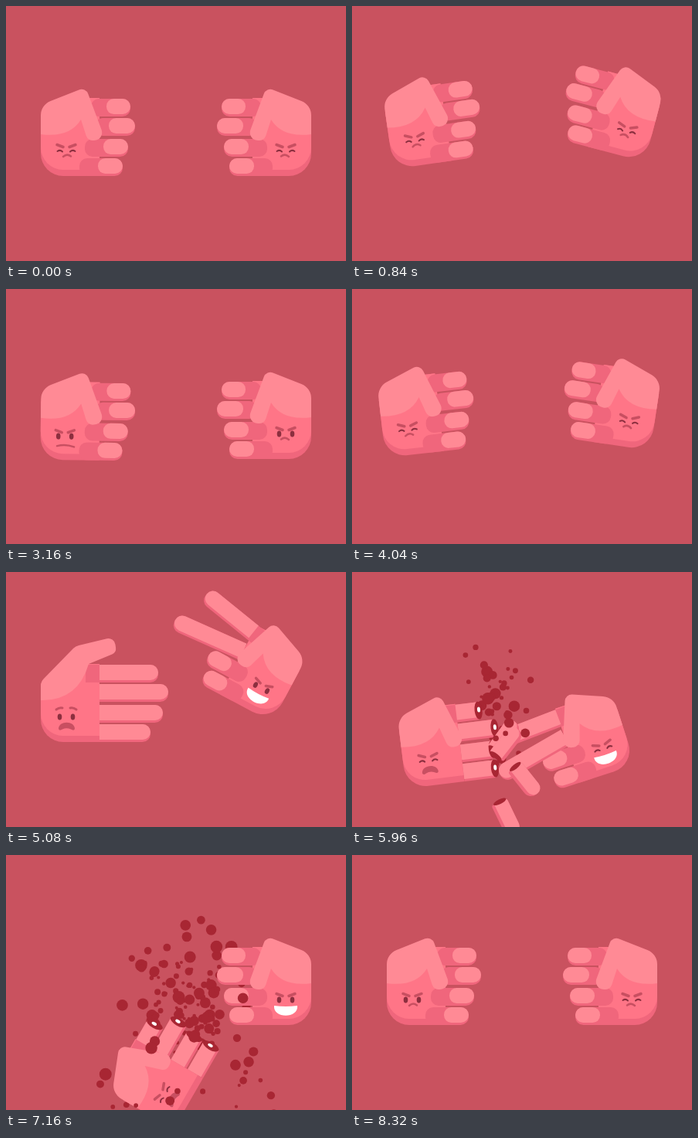
Recreate the animation shown at these times as an HTML page with a canvas. Size 440 px wide and 330 px high, loop 8360 ms.

```html
<!DOCTYPE html>
<html lang="en">
<head>
<meta charset="utf-8">
<title>Rock, paper, scissors</title>
<style>
html, body { margin: 0; width: 100%; height: 100%; overflow: hidden; background: #c9525f; }
canvas { display: block; width: 440px; height: 330px; }
</style>
</head>
<body>
<canvas id="stage" width="440" height="330"></canvas>
<script>
const ctx = document.getElementById('stage').getContext('2d');
const LOOP = 8360, CUT = 5680, REGROW = 7500;
const C = {
  bg: '#c9525f', light: '#ff8a95', mid: '#ff7587', dark: '#f0667c',
  brow: '#c84f61', eye: '#8c2f3f', blood: '#a82633', white: '#fff'
};

const mix = (a, b, k) => a + (b - a) * k;
const ease = k => (1 - Math.cos(Math.PI * k)) / 2;

// Keys are [time, ...values]; every span eases in and out.
function track(keys, t) {
  if (t <= keys[0][0]) return keys[0].slice(1);
  for (let i = 1; i < keys.length; i++) {
    const a = keys[i - 1], b = keys[i];
    if (t < b[0]) {
      const k = ease((t - a[0]) / (b[0] - a[0]));
      return a.slice(1).map((v, j) => mix(v, b[j + 1], k));
    }
  }
  return keys[keys.length - 1].slice(1);
}

const REST = [0, 0, 0], DOWN = [0, 34, 15], UP = [0, -31, -15];

function pumps(lag, settle) {
  const keys = [[0, ...REST], [lag, ...REST]];
  for (let i = 0; i < 3; i++) {
    keys.push([300 + 820 * i + lag, ...DOWN]);
    keys.push([i < 2 ? 710 + 820 * i + lag : settle, ...UP]);
  }
  return keys.concat([
    [settle + 310, ...REST], [3120 + lag, ...REST],
    [3420 + lag, ...DOWN], [3830 + lag, ...UP]
  ]);
}

// Both hands share one left-hand space; the right one is mirrored.
const leftMove = pumps(0, 2330).concat([
  [4080, -9, -6, -6], [4260, 3, 14, 4], [4540, ...REST], [5300, ...REST],
  [5640, 18, 57, -7], [5960, 18, 54, -7], [6200, 2, 42, -18],
  [6480, 30, 52, -30], [7160, 96, 115, -60], [REGROW - 1, 110, 270, -75],
  [REGROW, 0, 230, 20], [7900, 0, -36, -12], [8330, ...REST]
]);
const rightMove = pumps(110, 2400).concat([
  [4200, 0, 8, 5], [4520, 18, -50, -31], [4800, 18, -45, -28],
  [5340, 18, -45, -28], [5640, 50, 42, 19], [5960, 43, 49, 18],
  [6300, 6, -20, -12], [6560, ...REST], [6760, 0, -25, -10], [7020, ...REST]
]);
const paperOpen = [[4040, 0], [4240, 1], [5640, 1], [5860, 0]];
const scissorsOpen = [[4180, 0], [4440, 1], [6020, 1], [6300, 0]];
const scissorsTilt = [
  [4180, 0, 0], [4440, -11, 4], [5400, -11, 4], [5520, -18, 10],
  [5660, 3, 12], [6020, 3, 12], [6300, 0, 0]
];

const TOP = [120, 145, 172, 197];
const FIST_TIP = [161, 167, 158, 151];
const PAPER_TIP = [197, 210, 203, 187];
const SCISSORS_TIP = [199, 218, 158, 151];
const STUMP = [150, 168, 162, 162];
const FIST_PAD = [130, 133, 126, 119];
const FIST_BASE = [110, 115, 102, 95];

function box(x, y, w, h, r, color) {
  ctx.fillStyle = color;
  ctx.beginPath();
  ctx.roundRect(x, y, w, h, r);
  ctx.fill();
}
function oval(x, y, rx, ry, color) {
  ctx.fillStyle = color;
  ctx.beginPath();
  ctx.ellipse(x, y, rx, ry, 0, 0, 7);
  ctx.fill();
}
function stroke(color, width, x1, y1, cx, cy, x2, y2) {
  ctx.strokeStyle = color;
  ctx.lineWidth = width;
  ctx.lineCap = 'round';
  ctx.beginPath();
  ctx.moveTo(x1, y1);
  ctx.quadraticCurveTo(cx, cy, x2, y2);
  ctx.stroke();
}

function drawPalm() {
  const shape = (bottom, color) => {
    ctx.fillStyle = color;
    ctx.beginPath();
    ctx.moveTo(45, 145);
    ctx.lineTo(100, 119);
    ctx.lineTo(121, 119);
    ctx.lineTo(121, bottom);
    ctx.arcTo(45, bottom, 45, 150, 29);
    ctx.closePath();
    ctx.fill();
  };
  shape(220, C.dark);
  shape(212, C.mid);
}

function drawFinger(i, tip, open, tilt, cut) {
  const y = TOP[i], pad = mix(FIST_PAD[i], 121, open);
  const base = mix(FIST_BASE[i], i ? 121 : 103, open);
  const end = cut ? 0 : 10.5;
  ctx.save();
  ctx.translate(110, y + 10);
  ctx.rotate(tilt * Math.PI / 180);
  ctx.translate(-110, -y - 10);
  box(base, y, tip - base, 23, [10 * (1 - open), end, end, 10 * (1 - open)], C.dark);
  const back = 10 * (1 - open);
  box(pad, y, tip - pad, 20, [back, end, end, back], C.light);
  if (cut) {
    oval(tip, y + 11, 5, 11.5, C.blood);
    oval(tip + .5, y + 10, 2, 3.5, C.white);
  }
  ctx.restore();
}

function drawThumb(open) {
  const p = (x, y, u, v) => [mix(x, u, open), mix(y, v, open)];
  const corners = [
    [p(45, 128, 45, 142), mix(20, 13, open)],
    [p(103, 105, 90, 96), mix(9, 15, open)],
    [p(128, 172, 140, 84), mix(10, 9, open)],
    [p(106, 175, 143, 104), mix(9, 8, open)],
    [p(97, 147, 107, 119), 2]
  ];
  const notch = corners[4][0], bend = p(82, 171, 93, 167);
  ctx.fillStyle = C.light;
  ctx.beginPath();
  ctx.moveTo(45, 166);
  for (let i = 0; i < 4; i++) {
    ctx.arcTo(...corners[i][0], ...corners[i + 1][0], corners[i][1]);
  }
  ctx.lineTo(...notch);
  ctx.quadraticCurveTo(...bend, 45, 166);
  ctx.fill();
}

function drawFace(mood) {
  const squint = ['squint', 'cry', 'laugh'].includes(mood);
  const low = mood === 'stern' ? 2 : 0;
  const dx = mood === 'stern' ? -1.5 : 0;
  ctx.save();
  ctx.translate(78 + dx, 187 + low);
  for (const s of [-1, 1]) {
    if (mood === 'sad') stroke(C.brow, 3, s * 5, -11, s * 9, -12, s * 13, -9);
    else stroke(C.brow, 3.5, s * 4, -4.5, s * 8, -6, s * 12, -7.5);
    if (squint) stroke(C.eye, 2, s * 5, 1.5, s * 8, -1.5, s * 11.5, 1);
    else oval(s * 8.5, .5, 2.8, 4, C.eye);
  }
  if (mood === 'grin' || mood === 'laugh') {
    ctx.fillStyle = C.white;
    ctx.beginPath();
    ctx.moveTo(-15, 8);
    ctx.quadraticCurveTo(0, 10, 15, 8);
    ctx.bezierCurveTo(17, 25, -17, 25, -15, 8);
    ctx.fill();
  } else if (mood === 'sad' || mood === 'cry') {
    ctx.fillStyle = C.brow;
    ctx.beginPath();
    ctx.moveTo(-10, 16);
    ctx.bezierCurveTo(-10, 5, 11, 5, 11, 16);
    ctx.quadraticCurveTo(10, 19, 6, 16.5);
    ctx.quadraticCurveTo(0, 14, -5, 16.5);
    ctx.quadraticCurveTo(-9, 19, -10, 16);
    ctx.fill();
  } else if (mood === 'stern') {
    stroke(C.brow, 2.5, -10, 13, 1, 10, 12, 14);
  } else {
    stroke(C.brow, 2.5, -4, 8, 1, 3.5, 6, 7.5);
  }
  ctx.restore();
}

function drawHand(hand) {
  const [x, y, angle] = hand.move;
  ctx.save();
  if (hand.mirror) {
    ctx.translate(440, 0);
    ctx.scale(-1, 1);
  }
  ctx.translate(100 + x, 164 + y);
  ctx.rotate(angle * Math.PI / 180);
  ctx.translate(-100, -164);
  drawPalm();
  for (let i = 3; i >= 0; i--) {
    drawFinger(i, hand.tips[i], hand.open[i], hand.tilt[i], hand.cut);
  }
  drawThumb(hand.thumb);
  drawFace(hand.mood);
  ctx.restore();
}

function moodAt(list, t) {
  return list.filter(m => t >= m[0]).pop()[1];
}
const leftMoods = [[0, 'squint'], [2680, 'stern'], [3260, 'squint'], [4240, 'stern'],
  [4640, 'sad'], [CUT, 'cry'], [REGROW, 'open']];
const rightMoods = [[0, 'squint'], [2760, 'open'], [3360, 'squint'], [4400, 'grin'],
  [5600, 'laugh'], [6600, 'grin'], [7700, 'open'], [8260, 'squint']];

function seeded(seed) {
  return () => (seed = seed * 16807 % 2147483647) / 2147483647;
}
function stumpPoint(i, t) {
  const [x, y, angle] = track(leftMove, t), a = angle * Math.PI / 180;
  const u = STUMP[i] - 100, v = TOP[i] + 11 - 164;
  return [100 + x + u * Math.cos(a) - v * Math.sin(a),
          164 + y + u * Math.sin(a) + v * Math.cos(a)];
}
const rand = seeded(4217);
const drops = Array.from({ length: 290 }, (_, i) => {
  const birth = CUT + i / 290 * 1490;
  const [x, y] = stumpPoint(i % 4, birth);
  return {
    birth, x, y, front: i % 5 === 0,
    vx: -70 + 310 * rand(), vy: -240 - 420 * rand(), r: 2 + 6 * rand() ** 1.6
  };
});
function drawDrops(t, front) {
  for (const d of drops) {
    const s = (t - d.birth) / 1000;
    if (d.front !== front || s < 0) continue;
    const y = d.y + d.vy * s + 950 * s * s;
    if (y < 340) oval(d.x + d.vx * s, y, d.r, d.r, C.blood);
  }
}

// Severed fingertips tumble off the stage: x, y, angle, vx, vy, spin.
const pieces = [
  [172, 196, -.1, 90, -30, -3], [190, 224, .1, 35, -100, -3.6],
  [190, 250, 0, 125, -20, 3.2], [184, 270, 0, 60, 80, 4]
];
function drawPieces(t) {
  const s = (t - CUT) / 1000;
  if (s < 0 || s > 1) return;
  for (const [x, y, a, vx, vy, spin] of pieces) {
    ctx.save();
    ctx.translate(x + vx * s, y + vy * s + 260 * s * s + 700 * s ** 4);
    ctx.rotate(a + spin * s);
    box(-22, -10, 45, 22, [3, 11, 11, 3], C.dark);
    box(-22, -10, 45, 18, [3, 10, 10, 3], C.light);
    oval(-22, 0, 3, 9, C.blood);
    ctx.restore();
  }
}

function draw(t) {
  ctx.fillStyle = C.bg;
  ctx.fillRect(0, 0, 440, 330);
  const cut = t >= CUT && t < REGROW;
  const [paper] = track(paperOpen, t), [snip] = track(scissorsOpen, t);
  const [tilt1, tilt2] = track(scissorsTilt, t);
  drawDrops(t, false);
  drawHand({
    move: track(leftMove, t), cut, thumb: paper,
    tips: FIST_TIP.map((v, i) => cut ? STUMP[i] : mix(v, PAPER_TIP[i], paper)),
    open: Array(4).fill(cut ? 1 : paper), tilt: [0, 0, 0, 0],
    mood: moodAt(leftMoods, t)
  });
  drawHand({
    move: track(rightMove, t), mirror: true, thumb: 0,
    tips: FIST_TIP.map((v, i) => mix(v, SCISSORS_TIP[i], snip)),
    open: [snip, snip, 0, 0], tilt: [tilt1, tilt2, 0, 0],
    mood: moodAt(rightMoods, t)
  });
  drawPieces(t);
  drawDrops(t, true);
}

const start = performance.now();
function tick() {
  const t = (performance.now() - start) % LOOP;
  draw(Math.floor(t / 40) * 40);
  requestAnimationFrame(tick);
}
tick();
</script>
</body>
</html>
```
